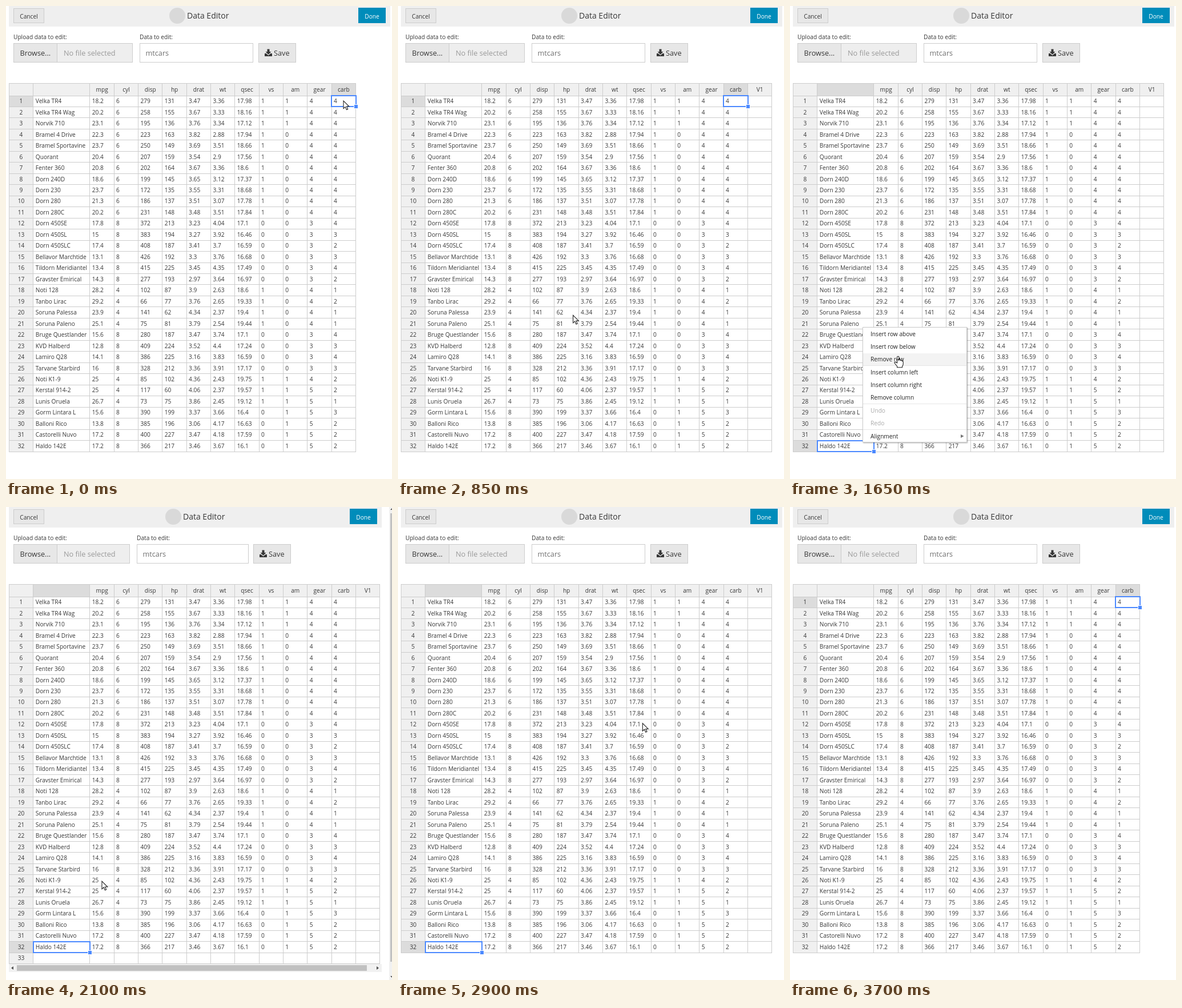
Write an HTML page with a canvas that moves like this. It is 676 px wide and 828 px high and loops after 3.8 s.

```html
<!DOCTYPE html>
<html lang="en">
<head>
<meta charset="utf-8">
<title>Data Editor</title>
<style>
  html, body { margin: 0; width: 100%; height: 100%; overflow: hidden; background: #fff; }
  canvas { display: block; }
</style>
</head>
<body>
<canvas id="stage" width="676" height="828"></canvas>
<script>
const ctx = document.getElementById('stage').getContext('2d');
const LOOP = 3800, STEP = 50, MOVE = 300;
const BLUE = '#4b89ff', INK = '#373737', LINE = '#ccc', BUTTON = '#e7e7e7';
const MENU_W = 183, MENU_H = 202.5, COL_W = 42.32, ROW_H = 19.47;

const HEADERS = ['', ...'mpg cyl disp hp drat wt qsec vs am gear carb V1'.split(' ')];
const MENU = ['Insert row above', 'Insert row below', 'Remove row', 'Insert column left',
  'Insert column right', 'Remove column', 'Undo', 'Redo', 'Alignment'];
const CARS = `Velka TR4,Velka TR4 Wag,Norvik 710,Bramel 4 Drive,Bramel Sportavine,Quorant,Fenter 360,
Dorn 240D,Dorn 230,Dorn 280,Dorn 280C,Dorn 450SE,Dorn 450SL,Dorn 450SLC,Bellavor Marchtide,
Tildorn Meridiantel,Gravster Emirical,Noti 128,Tanbo Lirac,Soruna Palessa,Soruna Paleno,
Bruge Questlander,KVD Halberd,Lamiro Q28,Tarvane Starbird,Noti K1-9,Kerstal 914-2,Lunis Oruela,
Gorm Lintara L,Balloni Rico,Castorelli Nuvo,Haldo 142E`.split(/,\s*/);

// Pointer stops by arrival time: right-clicked cells alternate with chosen menu items
const STOPS = [
  { at: 0, x: 591, y: 166 }, { at: 700, x: 531, y: 263 },
  { at: 1050, x: 127, y: 764 }, { at: 1750, x: 197, y: 595 },
  { at: 2350, x: 102, y: 792 }, { at: 2700, x: 175, y: 647 },
  { at: 3100, x: 631, y: 164 }, { at: 3500, x: 536, y: 281 }
];
const [addColumn, addRow, dropRow, dropColumn] = STOPS.filter((_, i) => i % 2).map(stop => stop.at + STEP);

const ARROW = new Path2D('M0 0V13.5L3.2 10.6L5.4 15.6L7.7 14.6L5.5 9.8H9.8Z');
const HAND = new Path2D('M-1.6 11V1Q-1.6-.5 0-.5T1.6 1V6Q4-.2 0 5.5Q4.5 4.8 4.8 7Q7 6 7.3 8Q9 7.3 9 9.5V13Q9 15 7.3 17V19H-1.6V17L-6 11.5Q-6.8 9.5-5 9.3Q-4 9.3-1.6 11Z');

let seed = 7;
function random() {
  seed = seed * 16807 % 2147483647;
  return seed / 2147483647;
}

const around = (mean, spread, digits) => +(mean + (random() * 2 - 1) * spread).toFixed(digits);

// Bigger engines: less mileage, more power and weight
function makeCar(name, i) {
  const row = i + 1;
  const cyl = row < 12 ? 6 : row < 18 ? 8 : row < 22 ? 4 : row < 26 ? 8 : row < 29 ? 4 : 8;
  const manual = row < 4 || row > 25;
  return [
    name,
    around(38 - 2.8 * cyl, 3, 1),
    cyl,
    around(62 * cyl - 145, 20 + 7 * cyl, 0),
    around(32 * cyl - 50, 25, 0),
    around(4.9 - 0.21 * cyl, 0.3, 2),
    around(0.6 + 0.43 * cyl, 0.4, 2),
    around(21.4 - 0.58 * cyl, 0.9, 2),
    +(cyl < 8),
    +manual,
    row > 26 ? 5 : cyl === 8 ? 3 : 4,
    cyl === 6 ? 4 : Math.floor(cyl / 4 + random() * cyl / 3)
  ];
}
const ROWS = CARS.map(makeCar);

const colX = col => col ? 147 + COL_W * (col - 1) : 48;
const rowY = row => row ? 157 + ROW_H * (row - 1) : 135;
const menuItemY = i => 13 + 22 * i + 0.85 * (Math.floor(i / 3) + (i === 8));

function rect(x, y, right, bottom, fill, border) {
  [x, y, right, bottom] = [x, y, right, bottom].map(Math.round);
  ctx.fillStyle = fill;
  ctx.fillRect(x, y, right - x, bottom - y);
  if (border) {
    ctx.strokeStyle = border;
    ctx.lineWidth = 1;
    ctx.strokeRect(x + .5, y + .5, right - x - 1, bottom - y - 1);
  }
}

function text(string, x, middle, { size = 10.16, color = INK, align = 'left' } = {}) {
  ctx.font = `${size}px "Open Sans", sans-serif`;
  ctx.fillStyle = color;
  ctx.textAlign = align;
  ctx.fillText(string, x, middle + size * .36);
}

function shape(color, ...points) {
  ctx.fillStyle = color;
  ctx.beginPath();
  points.forEach(([x, y]) => ctx.lineTo(x, y));
  ctx.fill();
}

function drawToolbar(narrow) {
  const shift = (wide, slim) => narrow ? slim : wide;
  rect(5, 0, shift(673, 658), 36, '#efefef');
  rect(13, 4, 67, 30, BUTTON, LINE);
  text('Cancel', 40, 18, { align: 'center' });
  const done = shift(617, 602);
  rect(done, 3, done + 48, 30, '#008cba');
  text('Done', done + 24, 18, { align: 'center', color: '#fff' });
  const title = shift(317, 310);
  ctx.fillStyle = '#d9d9d9';
  ctx.beginPath();
  ctx.arc(title - 17, 17, 14, 0, 7);
  ctx.fill();
  text('Data Editor', title, 16.5, { size: 14 });

  const field = shift(234, 229), save = shift(442, 433);
  text('Upload data to edit:', 13, 54.5);
  text('Data to edit:', field, 54.5);
  rect(13, 65, shift(222, 217), 99, '#eee', LINE);
  rect(13, 65, 90, 99, BUTTON, LINE);
  text('Browse...', 24.5, 82, { size: 12.7 });
  text('No file selected', 101, 82.5, { size: 12.7, color: '#999' });
  rect(field, 65, shift(433, 425), 99, '#fff', LINE);
  text('mtcars', field + 10.5, 82.5, { size: 12.7, color: '#6f6f6f' });
  rect(save, 65, save + 66, 99, BUTTON, LINE);
  text('Save', save + 27, 82, { size: 12.7 });
  const x = save + 17.5;
  rect(x - 6.5, 83, x + 6.5, 88, INK);
  shape(BUTTON, [x - 5, 82], [x + 5, 82], [x, 86.5]);
  shape(INK, [x - 2, 75.5], [x + 2, 75.5], [x + 2, 80], [x + 5, 80], [x, 85], [x - 5, 80], [x - 2, 80]);
}

function drawTable(rows, cols, selected, extraName) {
  const right = colX(cols), bottom = rowY(rows + 1);
  const { row: selRow, col: selCol } = selected;
  rect(5, 135, right, 157, '#f0f0f0');
  rect(5, 157, 48, bottom, '#f0f0f0');
  rect(colX(selCol), 135, colX(selCol + 1), 157, '#dcdcdc');
  rect(5, rowY(selRow), 48, rowY(selRow + 1), '#dcdcdc');
  for (let col = -1; col <= cols; col++) {
    const x = Math.round(col < 0 ? 5 : colX(col) - .6);
    rect(x, 135, x + 1, bottom + 1, LINE);
  }
  for (let row = 0; row <= rows + 1; row++) {
    const y = Math.round(rowY(row) - .5);
    rect(5, y, right, y + 1, LINE);
  }
  for (let col = 0; col < cols; col++) {
    text(HEADERS[col], (colX(col) + colX(col + 1)) / 2, 146.5, { align: 'center' });
  }
  for (let row = 1; row <= rows; row++) {
    const middle = rowY(row) + 9.6;
    text(row, 26.5, middle, { align: 'center' });
    (ROWS[row - 1] || [extraName]).forEach((value, col) => text(value, colX(col) + 3.8, middle));
  }

  const x = Math.round(colX(selCol)) - 1, y = Math.round(rowY(selRow)) - 1;
  const x2 = Math.round(colX(selCol + 1)) + 1, y2 = Math.round(rowY(selRow + 1)) + 1;
  ctx.strokeStyle = BLUE;
  ctx.lineWidth = 2;
  ctx.strokeRect(x + 1, y + 1, x2 - x - 2, y2 - y - 2);
  rect(x2 - 5, y2 - 5, x2 + 3, y2 + 3, '#fff');
  rect(x2 - 4, y2 - 4, x2 + 2, y2 + 2, BLUE);
}

function drawScrollbars() {
  rect(5, 800, 658, 814, '#f1f1f1');
  rect(19, 802, 632, 812, '#c1c1c1');
  shape('#505050', [9, 807], [13, 804], [13, 810]);
  shape('#505050', [653, 807], [649, 804], [649, 810]);
  rect(671, 0, 676, 828, '#f1f1f1');
  rect(673, 11, 676, 796, '#c1c1c1');
  shape('#505050', [673, 5], [676, 2], [676, 5]);
  shape('#505050', [673, 821], [676, 821], [676, 824]);
}

function drawMenu(x, y, hovered) {
  ctx.save();
  ctx.shadowColor = 'rgba(0,0,0,.35)';
  ctx.shadowBlur = 2;
  ctx.shadowOffsetX = ctx.shadowOffsetY = 1;
  rect(x, y, x + MENU_W, y + MENU_H, '#fff');
  ctx.restore();
  rect(x, y, x + MENU_W, y + MENU_H, '#fff', LINE);
  MENU.forEach((label, i) => {
    const middle = y + menuItemY(i);
    if (i === hovered) rect(x + 1, middle - 11, x + MENU_W - 1, middle + 10.5, '#f3f3f3');
    if (i && i % 3 === 0 || i === 8) rect(x + 1, middle - 12, x + MENU_W - 1, middle - 11, '#e6e6e6');
    text(label, x + 14, middle, { color: i === 6 || i === 7 ? '#aaa' : '#222' });
  });
  const arrowX = x + 172, arrowY = y + menuItemY(8);
  shape('#777', [arrowX, arrowY - 3], [arrowX + 5.5, arrowY], [arrowX, arrowY + 3]);
}

// Rests at each stop, then glides into the next one
function pointerAt(time) {
  const index = STOPS.findLastIndex(stop => stop.at <= time);
  const from = STOPS[index], to = STOPS[index + 1] || from;
  const p = Math.min(1, Math.max(0, (time - to.at + MOVE) / MOVE));
  const eased = p * (2 - p);
  return { x: from.x + (to.x - from.x) * eased, y: from.y + (to.y - from.y) * eased };
}

function menuAt(time) {
  const index = STOPS.findIndex((stop, i) =>
    i % 2 && time >= stop.at - MOVE - STEP && time < stop.at + STEP);
  if (index < 0) return null;
  const { x, y } = STOPS[index - 1];
  return { x: x + MENU_W > 676 ? x - MENU_W : x, y: y + MENU_H > 828 ? y - MENU_H : y };
}

function selectionAt(time, rows, cols) {
  const { x, y } = STOPS.filter((stop, i) => i % 2 === 0 && stop.at <= time).pop();
  return {
    row: Math.min(rows, 1 + Math.floor((y - 157) / ROW_H)),
    col: Math.min(cols - 1, Math.max(0, 1 + Math.floor((x - 147) / COL_W)))
  };
}

function drawPointer(x, y, hand) {
  const path = hand ? HAND : ARROW;
  ctx.save();
  ctx.translate(x, y);
  ctx.fillStyle = '#fff';
  ctx.strokeStyle = '#222';
  ctx.lineWidth = 1.1;
  ctx.fill(path);
  ctx.stroke(path);
  ctx.restore();
}

function draw(now) {
  const time = Math.floor(now % LOOP / STEP) * STEP;
  const extraRow = time >= addRow && time < dropRow;
  const rows = extraRow ? 33 : 32;
  const cols = time >= addColumn && time < dropColumn ? 13 : 12;
  const selected = selectionAt(time, rows, cols);

  rect(0, 0, 676, 828, '#fff');
  drawToolbar(extraRow);
  drawTable(rows, cols, selected, selected.row === 33 ? '33' : '');
  if (extraRow) drawScrollbars();

  const pointer = pointerAt(time), menu = menuAt(time);
  let hovered = -1;
  if (menu) {
    hovered = MENU.findIndex((_, i) => Math.abs(pointer.y - menu.y - menuItemY(i)) <= 11);
    drawMenu(menu.x, menu.y, hovered);
  }
  if (time < 3700) drawPointer(pointer.x, pointer.y, hovered >= 0);
}

const start = performance.now();
function tick() {
  draw(performance.now() - start);
  requestAnimationFrame(tick);
}
tick();
</script>
</body>
</html>
```
